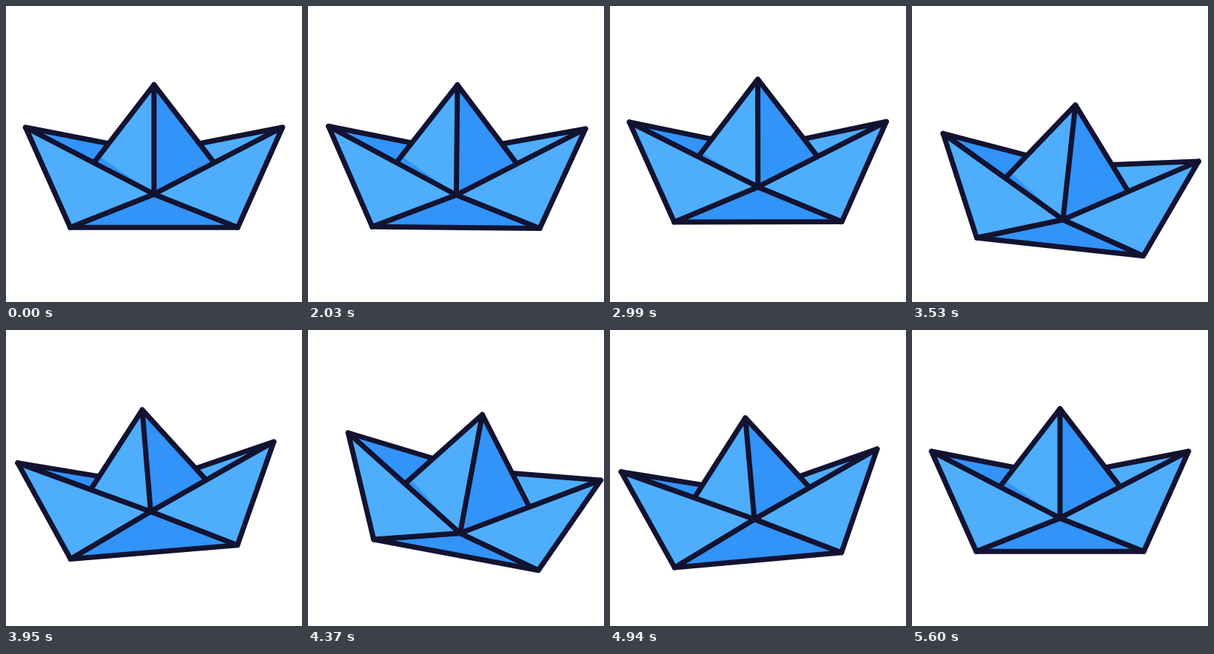
Write an HTML page that moves like this. It is 400 px wide and 400 px high and loops after 5630 ms.

```html
<!DOCTYPE html>
<html lang="en">
<head>
<meta charset="utf-8">
<title>Paper boat</title>
<style>
html, body { margin: 0; width: 100%; height: 100%; overflow: hidden; background: #fff; }
svg { display: block; width: 100vw; height: 100vh; }
path { stroke-linejoin: round; stroke-linecap: round; }
.light { fill: #4eaefc; }
.dark { fill: #3293f9; }
.none { fill: none; }
.line { stroke: #121331; stroke-width: 7; }
</style>
</head>
<body>
<svg viewBox="0 0 400 400">
  <g id="boat">
    <path id="backL" class="dark line"/>
    <path id="backR" class="light line"/>
    <path id="sail" class="dark"/>
    <path id="shade" class="light"/>
    <path id="edges" class="none line"/>
    <path id="base" class="dark line"/>
    <path id="sideL" class="light line"/>
    <path id="sideR" class="light line"/>
  </g>
</svg>
<script>
const LOOP = 5630, START = 2030, STEP = 30;
const $ = id => document.getElementById(id);

// Points relative to the middle of the keel
const peak = [0, -192.9];
const tipL = [-173.6, -135.2], tipR = [173.6, -135.2];
const keelL = [-113.2, 0], keelR = [113.2, 0];
const sailL = [-90, -76], sailR = [90, -76];

// Keys are [time, value] pairs, joined by half cosine waves
const swing = (hi, lo) => [
  [1995, 0], [2235, hi], [2782, lo], [3326, hi], [3882, lo],
  [4430, hi], [4985, lo], [5600, 0]
];
const tilt = swing(11.1, -5.35);
const pitch = swing(16, -10.9);
const heave = [
  [2000, 0], [2485, 26.8], [3060, -8.7], [3573, 26.9], [4150, -8.7],
  [4673, 26.8], [5263, -8.7], [5600, 0]
];

function at(keys, t) {
  const i = keys.findIndex(k => k[0] > t);
  if (i < 1) return 0;
  const [t0, a] = keys[i - 1], [t1, b] = keys[i];
  return a + (b - a) * (1 - Math.cos(Math.PI * (t - t0) / (t1 - t0))) / 2;
}

function poly(id, pts, end = "Z") {
  $(id).setAttribute("d", "M" + pts.map(p => p.map(n => n.toFixed(2))).join("L") + end);
}

function draw(t) {
  t = t < START ? 0 : t - (t - START) % STEP;
  const p = at(pitch, t);
  const front = [0, -45 + p], back = [0, -101.4 - p];
  const y = -96.3 + (p > 0 ? 0.45 * p : -p);
  const fold = [(peak[1] - y) / 1.3, y];

  $("boat").setAttribute("transform",
    `translate(200 ${299.2 + at(heave, t)}) rotate(${at(tilt, t)})`);
  poly("backL", [tipL, back, front]);
  poly("backR", [tipR, back, front]);
  poly("sail", [peak, sailR, front, sailL]);
  poly("shade", [peak, fold, front]);
  poly("edges", [sailL, peak, sailR], "M" + peak + "L" + front);
  poly("base", [keelL, front, keelR]);
  poly("sideL", [tipL, front, keelL]);
  poly("sideR", [tipR, front, keelR]);
}

function tick() {
  draw(performance.now() % LOOP);
  requestAnimationFrame(tick);
}
tick();
</script>
</body>
</html>
```
